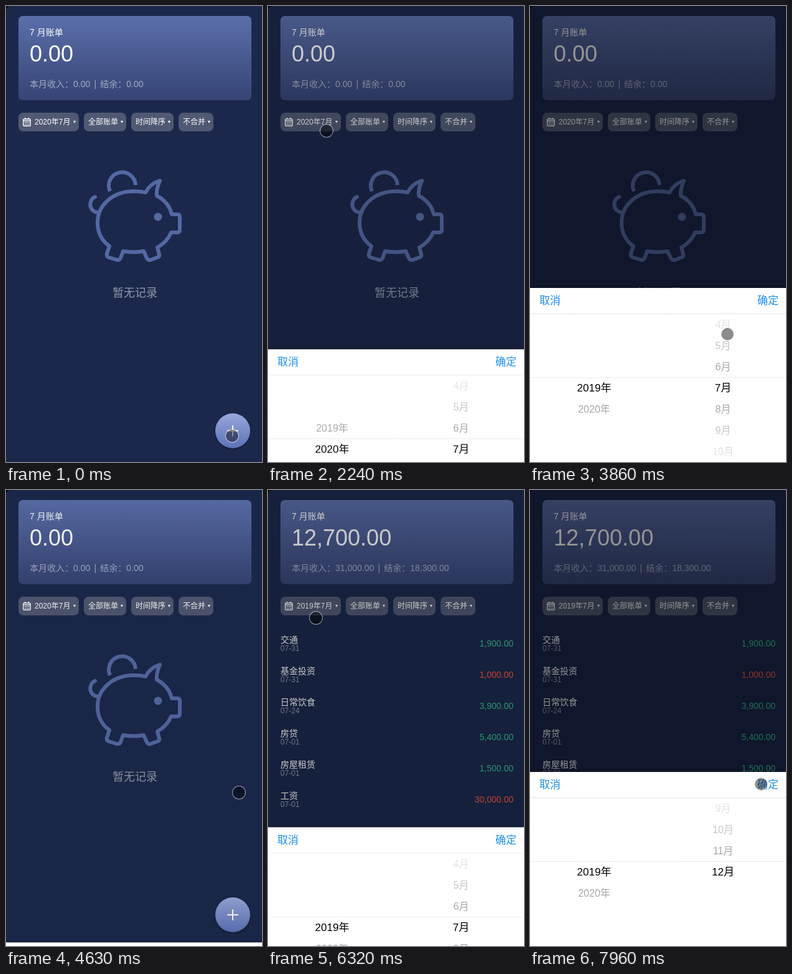
Animation, 411 px wide and 731 px high, one loop 8000 ms. Source, as an HTML page:

```html
<!DOCTYPE html>
<html lang="zh-CN">
<head>
<meta charset="utf-8">
<title>账单</title>
<style>
html, body { margin: 0; width: 100%; height: 100%; overflow: hidden; background: #000; }
body { font-family: "Liberation Sans", "Noto Sans CJK SC", "Noto Sans CJK", sans-serif; color: #fff; }
.app, .mask { position: absolute; left: 0; top: 0; width: 411px; height: 731px; overflow: hidden; }
.app { background: #1b284c; border-top-left-radius: 7px; }
.app *, .cursor { position: absolute; white-space: nowrap; box-sizing: border-box; }
.app span { line-height: 20px; }
.app b, .app i { position: static; font: inherit; }

.card { left: 20px; top: 16px; width: 374px; height: 135px; border-radius: 7px;
  background: linear-gradient(#5a6fab, #364474); }
.card span { left: 18px; font-size: 14px; }
.card .name { top: 16px; font-weight: 500; }
.card .total { top: 41px; font-size: 36px; line-height: 40px; }
.card .sum { top: 99px; color: #a3abc5; }
.card .sum i { display: inline-block; width: 16px; text-align: center; }

.chip { top: 171px; height: 30px; border-radius: 8px; background: #505973;
  font-size: 12px; font-weight: 500; }
.chip span { left: 7px; top: 5px; }
.chip::after { content: ""; position: absolute; right: 5.5px; top: 13px;
  border: solid transparent; border-width: 4px 2.5px 0; border-top-color: #fff; }

.none { left: 0; width: 414px; top: 450px; text-align: center; font-size: 18px; color: #9298a8; }
.row { left: 20px; width: 374px; height: 50px; font-size: 14px; }
.row span { left: 0; top: 5px; font-weight: 500; }
.row .day { top: 19px; font-size: 12px; font-weight: 400; color: #8f96a9; }
.row .sum { left: auto; right: 0; top: 11px; font-weight: 400; color: #35bd8c; }
.row .in { color: #f5533d; }

.add { left: 336px; top: 653px; width: 56px; height: 56px; border-radius: 50%;
  background: linear-gradient(#98a8da, #5c72b8); box-shadow: 0 1px 3px rgba(0, 0, 0, .5); }
.add::before, .add::after { content: ""; position: absolute; left: 19px; top: 27px;
  width: 18px; height: 2px; border-radius: 1px; background: #fff; }
.add::after { transform: rotate(90deg); }

.mask { background: rgba(0, 0, 0, .42); }
.sheet { left: 0; top: 452px; width: 411px; height: 279px; background: #fff; color: #000;
  box-shadow: 0 -1px 3px rgba(0, 0, 0, .4); }
.sheet .act { top: 11px; font-size: 17px; color: #1b8ee6; }
.view { left: 0; top: 41px; width: 411px; height: 238px; overflow: hidden; border-top: 1px solid #e6e6e6; }
.wheel { top: 102px; width: 120px; text-align: center; font-size: 16px; }
.wheel span { left: 0; width: 120px; line-height: 34px; }
.shade { left: 0; width: 411px; height: 102px; top: 0; border-bottom: 1px solid #ececec;
  background: linear-gradient(rgba(255, 255, 255, .95), rgba(255, 255, 255, .6)); }
.shade.low { top: 136px; border: 0; transform: scaleY(-1); }

.cursor { left: -11px; top: -11px; width: 22px; height: 22px; border-radius: 50%;
  background: rgba(0, 0, 0, .45); background-clip: padding-box;
  border: 1.5px solid rgba(255, 255, 255, .5); }

/* One shared 8 s clock: 1% = 80 ms */
.before, .after, .list, .mask, .sheet, .year, .month, .late, .y19, .y20, .m7, .m12, .cursor
  { animation: 8s linear infinite; }
.before { animation-name: before; animation-timing-function: step-end; }
.after { animation-name: after; animation-timing-function: step-end; }
.list { animation-name: list; }
.mask { animation-name: dim; }
.sheet { animation-name: slide; animation-timing-function: ease-out; }
.year { animation-name: year; }
.month { animation-name: month; }
.late { animation-name: late; animation-timing-function: step-end; }
.y19 { animation-name: y19; animation-timing-function: step-end; }
.y20 { animation-name: y20; animation-timing-function: step-end; }
.m7 { animation-name: m7; animation-timing-function: step-end; }
.m12 { animation-name: m12; animation-timing-function: step-end; }
.cursor { animation-name: move; animation-timing-function: ease-in-out; }

@keyframes before { 0% { display: inline; visibility: visible; } 58.5%, 100% { display: none; visibility: hidden; } }
@keyframes after { 0% { display: none; visibility: hidden; } 58.5%, 100% { display: inline; visibility: visible; } }
@keyframes list { 0%, 58.5% { opacity: 0; } 63.5%, 100% { opacity: 1; } }
@keyframes dim {
  0%, 26.125% { opacity: 0; } 30.125%, 54.5% { opacity: 1; }
  58.5%, 77% { opacity: 0; } 81%, 100% { opacity: 1; }
}
@keyframes slide {
  0%, 26.125% { transform: translateY(284px); } 30.125%, 54.5% { transform: none; }
  58.5%, 77% { transform: translateY(284px); } 81%, 100% { transform: none; }
}
@keyframes year {
  0%, 35.875% { transform: translateY(-34px); }
  37.4%, 39.625% { transform: translateY(-9px); animation-timing-function: ease-out; }
  42.5%, 100% { transform: none; }
}
@keyframes month {
  0%, 84.25% { transform: translateY(-204px); }
  85.75% { transform: translateY(-265px); }
  87.125% { transform: translateY(-327px); animation-timing-function: ease-out; }
  89.5%, 92.5% { transform: translateY(-347px); }
  93.25% { transform: translateY(-352px); animation-timing-function: ease-out; }
  96.5%, 100% { transform: translateY(-374px); }
}
@keyframes late { 0% { opacity: 0; } 42.5%, 100% { opacity: 1; } }
@keyframes y20 { 0% { font-size: 17px; } 42.5%, 100% { font-size: 16px; } }
@keyframes y19 { 0% { font-size: 16px; } 42.5%, 100% { font-size: 17px; } }
@keyframes m7 { 0% { font-size: 17px; } 96.5%, 100% { font-size: 16px; } }
@keyframes m12 { 0% { font-size: 16px; } 96.5%, 100% { font-size: 17px; } }
@keyframes move {
  0%, 17.61% { transform: translate(363px, 689px); }
  17.625% { transform: translate(356px, 684px); }
  24.25%, 29.5% { transform: translate(94px, 200px); }
  33% { transform: translate(111px, 473px); animation-timing-function: ease-out; }
  35.875% { transform: translate(112px, 535px); animation-timing-function: linear; }
  37.4%, 40.6% { transform: translate(112px, 560px); }
  45.625%, 48.24% { transform: translate(317px, 528px); }
  48.25% { transform: translate(317px, 526px); }
  51.875%, 64.125% { transform: translate(374px, 485px); }
  69.25%, 71.5% { transform: translate(18px, 185px); }
  74.375%, 79.5% { transform: translate(77px, 205px); }
  83.75%, 84.25% { transform: translate(326px, 531px); animation-timing-function: linear; }
  85.75% { transform: translate(327px, 470px); animation-timing-function: linear; }
  87.125% { transform: translate(330px, 408px); animation-timing-function: ease-out; }
  89.5%, 92.5% { transform: translate(333px, 388px); animation-timing-function: linear; }
  93.25% { transform: translate(333px, 383px); }
  99.5%, 100% { transform: translate(371px, 471.5px); }
}
</style>
</head>
<body>
<div class="app">
  <div class="card">
    <span class="name">7 月账单</span>
    <span class="total"><b class="before">0.00</b><b class="after">12,700.00</b></span>
    <span class="sum">本月收入：<b class="before">0.00</b><b class="after">31,000.00</b><i>|</i>结余：<b class="before">0.00</b><b class="after">18,300.00</b></span>
  </div>

  <div class="chip" style="left:20px;width:97px">
    <svg style="left:7px;top:8px" width="13" height="14" fill="none" stroke="#fff" stroke-width="1.4">
      <rect x=".8" y="2.2" width="11.4" height="11" rx="1.2"/>
      <path d="M1 5H12M3.8 0V3M9.2 0V3"/>
      <path d="M3 7.8H10.4M3 10.6H10.4" stroke-dasharray="1.8 1"/>
    </svg>
    <span style="left:26px"><b class="before">2020</b><b class="after">2019</b>年7月</span>
  </div>
  <div class="chip" style="left:125px;width:68px"><span>全部账单</span></div>
  <div class="chip" style="left:201px;width:68px"><span>时间降序</span></div>
  <div class="chip" style="left:277px;width:56px"><span>不合并</span></div>

  <div class="before" style="left:0;top:0">
    <svg style="left:0;top:0" width="411" height="440" fill="none" stroke="#5468a3" stroke-width="6" stroke-linejoin="round">
      <path d="M167 297A21.5 21.5 0 1 1 208 287"/>
      <path d="M143 306C131 311 133 331 149 331" stroke-linecap="round"/>
      <path d="M224 299C218 297.500 211 297 205 297C172 297 147 319 147 347C147 364 155 377 166 385L162 397Q161 402 165 403L178 407Q182 408 184 404L188 393Q205 396 221 393L226 404Q228 408 232 407L243 403Q247 402 246 398L243 387Q259 378 265 363L275 363Q279 363 279 358V338Q279 334 275 334H266Q262 315 242 304Q241 294 247 280Q231 285 224 299Z"/>
      <circle cx="244" cy="338" r="6.500" fill="#5468a3" stroke="none"/>
    </svg>
    <span class="none">暂无记录</span>
  </div>

  <div class="list" style="left:0;top:0"></div>
  <div class="add"></div>
  <div class="mask"></div>

  <div class="sheet">
    <span class="act" style="left:15px">取消</span>
    <span class="act" style="left:365px">确定</span>
    <div class="view">
      <div class="wheel year" style="left:43px">
        <span class="y19" style="top:0">2019年</span>
        <span class="y20" style="top:34px">2020年</span>
      </div>
      <div class="wheel month" style="left:250px"></div>
      <div class="shade"></div>
      <div class="shade low"></div>
    </div>
  </div>
</div>
<div class="cursor"></div>

<script>
const bills = [
  ["交通", "07-31", "1,900.00"],
  ["基金投资", "07-31", "1,000.00", "in"],
  ["日常饮食", "07-24", "3,900.00"],
  ["房贷", "07-01", "5,400.00"],
  ["房屋租赁", "07-01", "1,500.00"],
  ["工资", "07-01", "30,000.00", "in"]
];
document.querySelector(".list").innerHTML = bills.map(([name, day, sum, kind = ""], i) =>
  `<div class="row" style="top:${225 + i * 50}px"><span>${name}</span>` +
  `<span class="day">${day}</span><span class="sum ${kind}">${sum}</span></div>`).join("");

// The wrapper keeps the late months hidden while the label changes size
document.querySelector(".month").innerHTML = Array.from({ length: 12 }, (_, i) => {
  const m = i + 1;
  return `<div class="${m > 7 ? "late" : ""}" style="left:0;top:${i * 34}px">` +
    `<span class="m${m}">${m}月</span></div>`;
}).join("");
</script>
</body>
</html>
```
